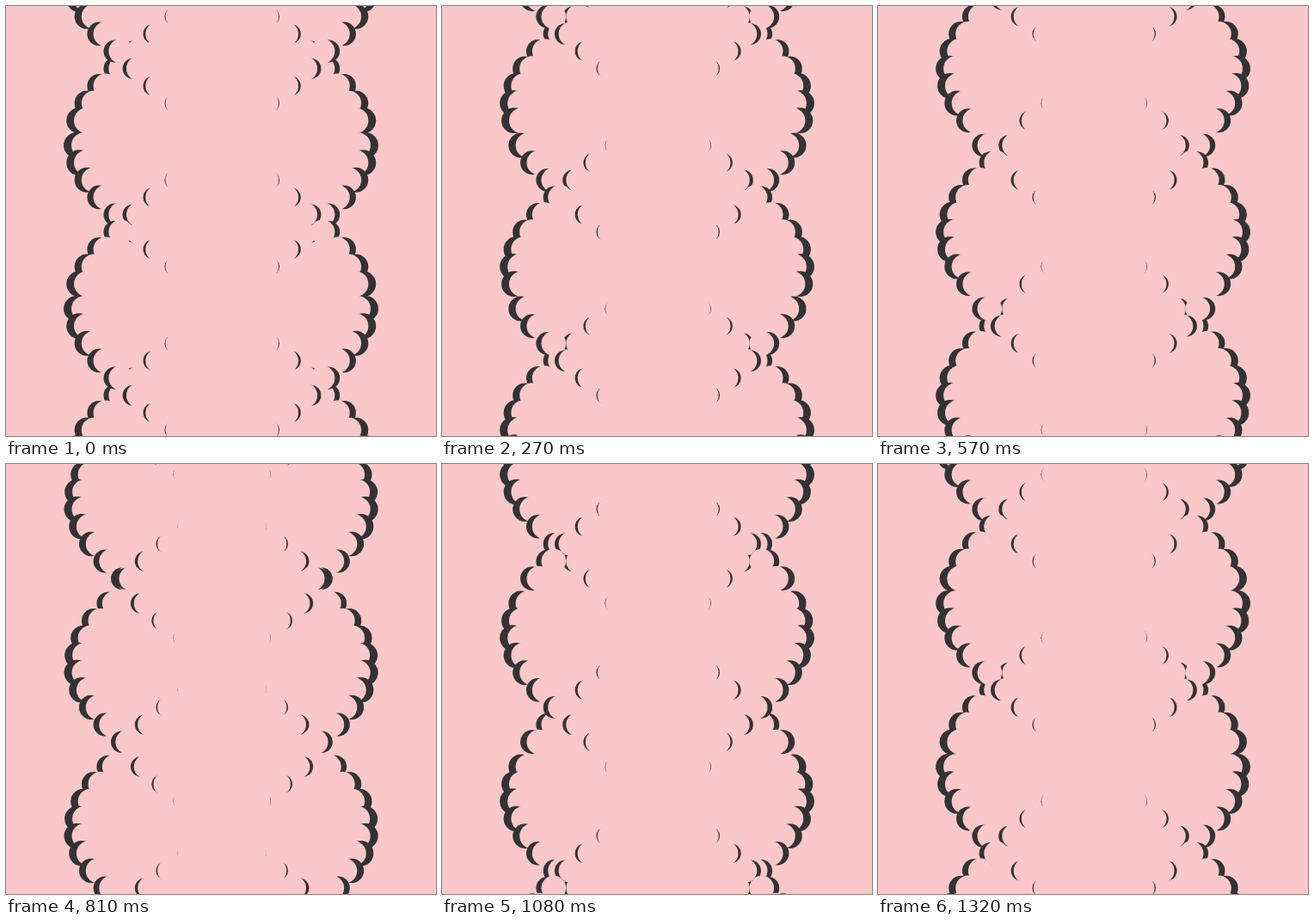
Animation, 500 px wide and 500 px high, one loop 1350 ms. Source, as an HTML page with a canvas:

```html
<!DOCTYPE html>
<html lang="en">
<head>
<meta charset="utf-8">
<title>Crescent helix</title>
<style>
  html, body { margin: 0; width: 100%; height: 100%; overflow: hidden; background: #fac8c8; }
  canvas { display: block; width: 500px; height: 500px; }
</style>
</head>
<body>
<canvas id="stage" width="500" height="500"></canvas>
<script>
const ctx = document.getElementById('stage').getContext('2d');
const PINK = '#fac8c8', DARK = '#333333';
const LOOP = 1350, STEP = 30, ROWS = 9, MID = 250;

function disc(x, y, r, color) {
  ctx.fillStyle = color;
  ctx.beginPath();
  ctx.arc(x, y, r, 0, Math.PI * 2);
  ctx.fill();
}

// A dark disc partly hidden by a pink one that sits nearer the axis.
function crescent(side, swing, y) {
  const reach = 7 + 139.4 * swing + 21.6 * swing ** 3;
  if (reach < 38) return;
  const lean = side > 0 ? 2.6 * Math.sqrt(Math.max(0, 1 - swing * swing)) : 0;
  const x = MID + side * (reach + lean);
  disc(x, y, 7.6 + 0.044 * reach, DARK);
  disc(x - side * (2.5 + 0.037 * reach), y, 13 + 0.01 * reach, PINK);
}

function strand(wave, shift) {
  for (let group = -1; group <= 1; group++) {
    for (let row = 0; row < ROWS; row++) {
      const y = 162 + group * 190 + row * 20.15;
      const angle = (group * ROWS + row + shift) * Math.PI / (2 * ROWS);
      const swing = Math.abs(wave(angle));
      crescent(-1, swing, y);
      crescent(1, swing, y);
    }
  }
}

function draw(ms) {
  const t = Math.floor((ms % LOOP) / STEP) * STEP;
  const shift = t / LOOP * ROWS;
  ctx.fillStyle = PINK;
  ctx.fillRect(0, 0, 500, 500);
  strand(Math.cos, shift);
  strand(Math.sin, shift);
}

let start;
function tick(now) {
  start ??= now;
  draw(Math.max(0, now - start));
  requestAnimationFrame(tick);
}
draw(0);
requestAnimationFrame(tick);
</script>
</body>
</html>
```
